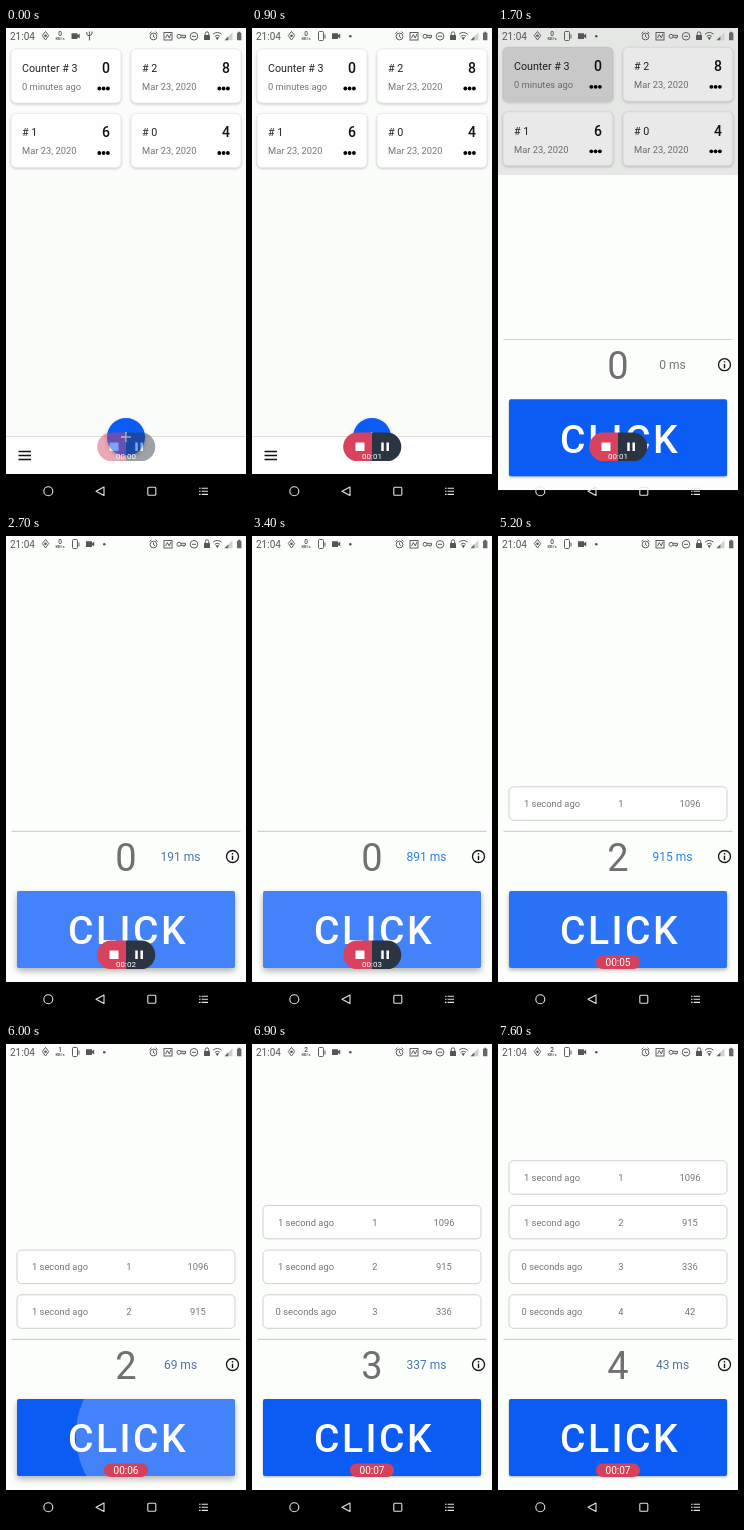
Animation, 240 px wide and 480 px high, one loop 8 s. Source, as an HTML page:

```html
<!DOCTYPE html>
<html lang="en">
<head>
<meta charset="utf-8">
<title>Click timer</title>
<style>
html, body { margin: 0; width: 100%; height: 100%; overflow: hidden; background: #000; }
svg { display: block; width: 100vw; height: 100vh; }
text { font-family: Roboto, "Noto Sans", sans-serif; white-space: pre; }
.card { fill: #fdfefd; stroke: #e6e7e6; stroke-width: .8; filter: drop-shadow(0 1px 1.2px rgba(0,0,0,.2)); }
.fab { filter: drop-shadow(0 2px 2px rgba(0,0,0,.3)); }
.line { fill: none; stroke: #5c5c5c; stroke-width: 1; }
.nav { fill: none; stroke: #e4e4e4; stroke-width: 1.1; }
</style>
</head>
<body>
<svg viewBox="0 0 240 480" preserveAspectRatio="none">
  <defs>
    <clipPath id="reveal"><rect id="revealBox" width="240" height="500"/></clipPath>
    <clipPath id="btnClip"><rect x="11" y="355" width="218" height="77" rx="2"/></clipPath>
    <clipPath id="cardClip"><rect x="5" y="21" width="110" height="54" rx="5"/></clipPath>
    <clipPath id="listClip"><rect width="240" height="294"/></clipPath>
  </defs>
  <rect width="240" height="480"/>
  <g id="home"></g>
  <g id="page"></g>
  <g id="status"></g>
  <g id="nav"></g>
  <g id="recorder"></g>
</svg>
<script>
const LOOP = 8000, STEP = 100, BLUE = '#0b5cf5', OPEN = 1605;
const presses = [
  { at: 2509, ms: 1096, shown: 1097, ago: '1 second ago' },
  { at: 4200, ms: 915, shown: 915, ago: '1 second ago' },
  { at: 5931, ms: 336, shown: 337, ago: '0 seconds ago' },
  { at: 7095, ms: 42, shown: 43, ago: '0 seconds ago' }
];

const $ = id => document.getElementById(id);
const set = (id, attrs) => { for (const k in attrs) $(id).setAttribute(k, attrs[k]); };
const clamp = v => Math.min(1, Math.max(0, v));
const text = (x, cy, size, str, attrs = '') =>
  `<text x="${x}" y="${cy + size * .355}" font-size="${size}" ${attrs}>${str}</text>`;
const mid = 'text-anchor="middle"';

// y at x on a cubic through four points
function curve(x, p) {
  const at = (u, i) => (1 - u) ** 3 * p[i] + 3 * u * (1 - u) ** 2 * p[i + 2]
    + 3 * u * u * (1 - u) * p[i + 4] + u ** 3 * p[i + 6];
  let lo = 0, hi = 1;
  for (let i = 0; i < 24; i++) {
    const m = (lo + hi) / 2;
    if (at(m, 0) < x) lo = m; else hi = m;
  }
  return at(lo, 1);
}
const slowIn = x => curve(x, [0, 0, .4, 0, .2, 1, 1, 1]);
const extraSlowIn = x => x < 1 / 6
  ? curve(x, [0, 0, .05, 0, .1333, .06, .1667, .4])
  : curve(x, [.1667, .4, .2083, .82, .25, 1, 1, 1]);
const inOut = x => x * x * (3 - 2 * x);

function card(x, y, title, date, count, ripple = '') {
  const dots = [93.3, 97.6, 101.9].map(d => `<circle cx="${x + d - 5 + 5}" cy="${y + 39.5}" r="1.9"/>`).join('');
  return `<rect class="card" x="${x + 5}" y="${y}" width="110" height="54" rx="5"/>${ripple}`
    + text(x + 16, y + 19, 10.7, title, 'fill="#222"')
    + text(x + 104, y + 19, 14, count, 'fill="#111" font-weight="500" text-anchor="end"')
    + text(x + 16, y + 37.5, 9.35, date, 'fill="#757575"') + dots;
}

$('home').innerHTML = `
  <rect width="240" height="446" fill="#fafcfa"/>
  ${card(0, 21, 'Counter # 3', '0 minutes ago', 0,
    '<g clip-path="url(#cardClip)"><circle id="cardRipple" cx="60" cy="47" fill="#000" fill-opacity=".14"/></g>')}
  ${card(120, 21, '# 2', 'Mar 23, 2020', 8)}
  ${card(0, 85.5, '# 1', 'Mar 23, 2020', 6)}
  ${card(120, 85.5, '# 0', 'Mar 23, 2020', 4)}
  <rect y="408.5" width="240" height="37.5" fill="#fdfefd"/>
  <path d="M0 408.5H240" stroke="#dcdedc"/>
  <path d="M12.5 423.5H25M12.5 427.5H25M12.5 431.5H25" stroke="#111" stroke-width="1.4"/>
  <circle class="fab" cx="120" cy="409" r="19" fill="${BLUE}"/>
  <path d="M115 409H125M120 404V414" stroke="#fff" stroke-width="1.3"/>
  <rect y="446" width="240" height="60"/>`;

const row = (p, i) => `<g id="row${i}">
  <rect x="11" y=".5" width="218" height="33.5" rx="4.5" fill="#fdfefd" stroke="#cfd0cf"/>`
  + text(54, 17.3, 9.35, p.ago, `${mid} fill="#757575"`)
  + text(123, 17.3, 9.35, i + 1, `${mid} fill="#757575"`)
  + text(192, 17.3, 9.35, p.ms, `${mid} fill="#757575"`) + '</g>';

$('page').innerHTML = `<g clip-path="url(#reveal)">
  <rect width="240" height="446" fill="#fcfefc"/>
  <g clip-path="url(#listClip)">${presses.map(row).join('')}</g>
  <path d="M5.5 295.3H234.5" stroke="#cfd0cf" stroke-width="1.2"/>
  ${text(120, 321.5, 38, '', `${mid} fill="#707070" id="count"`)}
  ${text(174.5, 321, 12, '', `${mid} id="ms"`)}
  <circle cx="226.5" cy="320.5" r="6" fill="none" stroke="#111" stroke-width="1.3"/>
  <path d="M226.5 319.7V324M226.5 317V318.4" stroke="#111" stroke-width="1.4"/>
  <rect id="button" x="11" y="355" width="218" height="77" rx="2" fill="${BLUE}"/>
  <g clip-path="url(#btnClip)"><circle id="ripple" cx="154" cy="391" fill="#fff"/></g>
  ${text(122, 394.5, 39, 'CLICK', `${mid} fill="#fff" font-weight="500" letter-spacing="2.5"`)}
  <rect y="446" width="240" height="60"/>
</g>`;

const camera = x => `<path d="M${x - 4} 5.3h6v2l2.2-1.7v5l-2.2-1.7v2h-6z" fill="#555"/>`;
$('status').innerHTML = `
  ${text(4, 8.3, 10, '21:04', 'fill="#555"')}
  <path class="line" d="M39.5 3.5l3.2 4-3.2 4.5-3.2-4.5z"/><circle cx="39.5" cy="7.7" r="1.3" fill="#555"/>
  ${text(54, 5.5, 6.5, '', `${mid} fill="#444" font-weight="500" id="rate"`)}
  ${text(54, 11, 4.2, 'KB/s', `${mid} fill="#444" font-weight="500"`)}
  <g id="early">${camera(69.5)}<path class="line" d="M80.8 4v2.5l2.6 1.5 2.6-2V3.5M83.4 3.5V12.5"/></g>
  <g id="late"><rect class="line" x="66.5" y="3.5" width="5" height="9" rx="1"/>
    <path class="line" d="M73 6.5v4"/>${camera(84)}<circle cx="98.3" cy="8.3" r="1.3" fill="#555"/></g>
  <circle class="line" cx="147.5" cy="8.5" r="3.4"/><path class="line" d="M147.5 6.5v2.2l1.5 1M143.5 5.5l2-1.8M151.5 5.5l-2-1.8"/>
  <rect class="line" x="158" y="4.5" width="8" height="7.5"/><path class="line" d="M159.5 10l1.8-3.5 2 3.5 1.5-4"/>
  <circle class="line" cx="173" cy="8.3" r="2"/><path class="line" d="M175 7.3h4.5v2h-4.5M178 9.3v1.5"/>
  <circle class="line" cx="188" cy="8.3" r="3.8"/><path class="line" d="M186 8.3h4"/>
  <rect x="198" y="7" width="6" height="5" rx=".6" fill="#555"/><path class="line" d="M199.3 7V5.5a1.7 1.7 0 0 1 3.4 0V7"/>
  <path class="line" d="M207 6.2q4.3-3.6 8.6 0M208.7 8.3q2.6-2.2 5.2 0"/><path d="M209.5 9.2h3.6l-1.8 3z" fill="#555"/>
  <path d="M218.5 12.3h8v-8z" fill="#cfd0cf"/><path d="M218.5 12.3h3.8V8.5z" fill="#666"/>
  <path d="M231 4.8h1.2v-1h2v1h1.2v7.5H231z" fill="#666"/>`;

$('nav').innerHTML = `
  <circle class="nav" cx="42.3" cy="463.3" r="4.5"/>
  <path class="nav" d="M90 463.3l8-4.3v8.6z" stroke-linejoin="round"/>
  <rect class="nav" x="141.8" y="459.3" width="8" height="8" rx="1"/>
  <path class="nav" d="M193 460.2h1.6m1 0h6.4M193 463.3h1.6m1 0h6.4M193 466.4h1.6m1 0h6.4"/>`;

$('recorder').innerHTML = `
  <g id="panel">
    <path d="M120 404.5H105.500a14.300 14.300 0 0 0 0 28.600H120z" fill="#d8425d"/>
    <path d="M120 404.500h15a14.300 14.300 0 0 1 0 28.600H120z" fill="#2b3442"/>
    <rect x="103.500" y="414.500" width="9" height="8.500" rx=".6" fill="#fff"/>
    <path d="M130.500 414.500v8.500M135.700 414.500v8.500" stroke="#fff" stroke-width="2.500"/>
  </g>
  <rect id="pill" x="98" y="419.500" width="44" height="13.500" rx="6.700" fill="#d5405a"/>
  ${text(120, 428.3, 8, '', `${mid} fill="#fff" id="clock"`)}`;

function mix(k) {
  const a = [88, 112, 150], b = [38, 128, 240];
  return `rgb(${a.map((v, i) => Math.round(v + (b[i] - v) * k))})`;
}

function drawOpening(t) {
  const p = clamp((t - OPEN) / 425), move = slowIn(p);
  set('home', {
    transform: `translate(0 ${-9.6 * move})`,
    opacity: 1 - .1 * clamp((t - OPEN) / 117),
    visibility: p < 1 ? 'visible' : 'hidden'
  });
  set('cardRipple', { r: .32 * Math.max(0, t - 1360) });
  set('page', {
    transform: `translate(0 ${19.7 * (1 - move)})`,
    visibility: t > OPEN ? 'visible' : 'hidden'
  });
  set('revealBox', { y: 460 * (1 - extraSlowIn(p)) });
}

function drawButton(t) {
  const cur = presses.filter(p => t >= p.at - 30).pop();
  let lit = 0, radius = 0;
  if (cur) {
    const age = t - cur.at + 30, up = Math.max(cur.at + cur.ms, cur.at + 150);
    radius = .85 * age;
    lit = clamp(age / 75) * (1 - clamp((t - up) / 200));
  }
  set('ripple', { r: radius, 'fill-opacity': .23 * lit });
  $('button').style.filter = `drop-shadow(0 ${1 + 2 * lit}px ${1 + 2 * lit}px rgba(0,0,0,.3))`;

  const run = presses.filter(p => t >= p.at).pop();
  const ms = !run ? 0 : t < run.at + run.ms ? t - run.at : run.shown;
  $('ms').textContent = ms + ' ms';
  set('ms', { fill: run ? mix(clamp(ms / 1000)) : '#757575' });
  $('count').textContent = presses.filter(p => t >= p.at + p.ms).length;
}

function drawRows(t) {
  const grow = presses.map(p => inOut(clamp((t - p.at - p.ms - 95) / 300)));
  grow.forEach((g, i) => {
    const below = grow.slice(i + 1).reduce((a, b) => a + b, 0);
    set('row' + i, { transform: `translate(0 ${250.3 - 44.7 * below})`, opacity: g });
  });
}

function drawRecorder(t) {
  const small = t >= 4200;
  const alpha = t < 2000 ? clamp(.45 + t / 350) : 1 - clamp((t - 3850) / 220);
  set('panel', { opacity: alpha });
  set('pill', { visibility: small ? 'visible' : 'hidden' });
  $('clock').textContent = '00:0' + Math.floor((t + 100) / 1000);
  set('clock', small ? { 'font-size': 10, y: 430 } : { 'font-size': 8, y: 431 });
}

function draw(t) {
  drawOpening(t);
  drawButton(t);
  drawRows(t);
  drawRecorder(t);
  $('rate').textContent = t < 5400 ? 0 : t < 6400 ? 1 : 2;
  set('early', { visibility: t < 100 ? 'visible' : 'hidden' });
  set('late', { visibility: t < 100 ? 'hidden' : 'visible' });
}

const start = performance.now();
let last = -1;
function tick() {
  const t = Math.floor(((performance.now() - start) % LOOP) / STEP) * STEP;
  if (t !== last) draw(last = t);
  requestAnimationFrame(tick);
}
tick();
</script>
</body>
</html>
```
